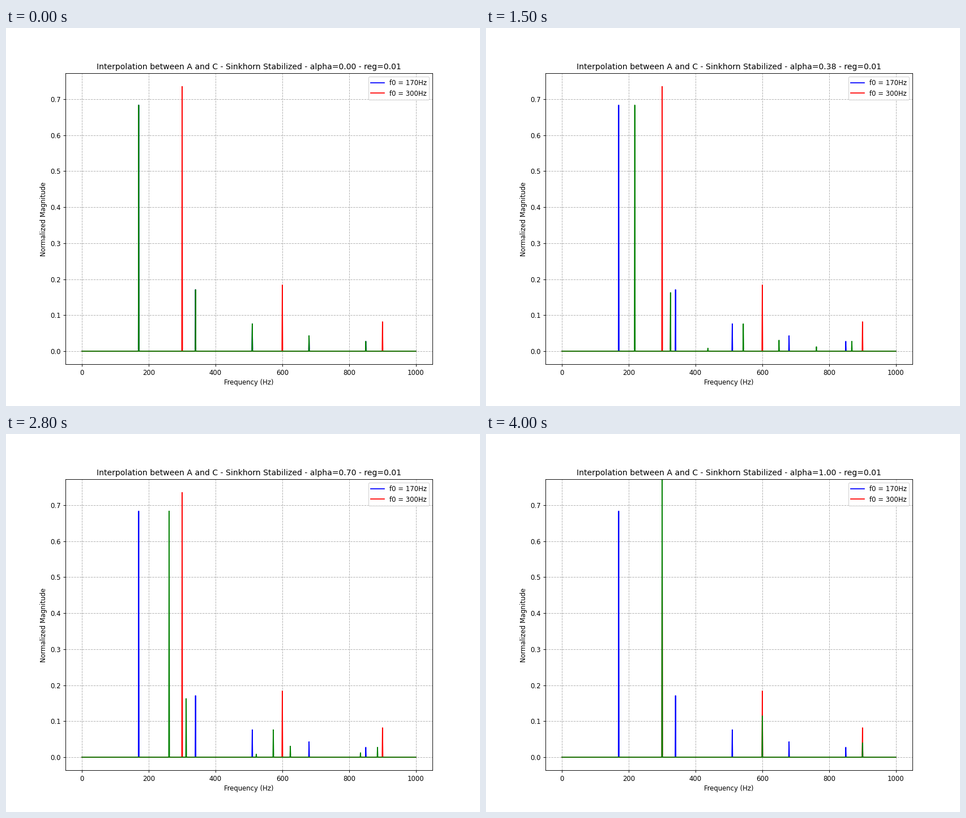
A matplotlib script that plays this animation: 837x669 px, repeating every 4.1 s.

```python
import numpy as np
import matplotlib.pyplot as plt
from matplotlib.animation import FuncAnimation

WIDTH, HEIGHT, DPI = 837, 669, 83.7
STEPS = 40
REG = 0.01
FREQS = np.arange(1001)


def harmonics(f0):
    """Normalized spectrum with 1/n^2 partials of f0."""
    n = np.arange(1, 999 // f0 + 1)
    mags = np.zeros(FREQS.size)
    mags[n * f0] = 1 / n**2
    return mags / mags.sum()


def sinkhorn(source, target, iterations=9):
    """Entropic transport plan, stopped before full convergence."""
    x = FREQS / 1000
    kernel = np.exp(-(x[:, None] - x) ** 2 / REG)
    u = np.ones(x.size)
    for _ in range(iterations):
        v = target / (kernel.T @ u)
        u = source / (kernel @ v)
    return u[:, None] * kernel * v


low, high = harmonics(170), harmonics(300)
plan = sinkhorn(low, high)
start, end = np.nonzero(plan > 1e-4)
mass = plan[start, end]


def interpolate(step):
    mags = np.zeros(FREQS.size)
    np.add.at(mags, start + (end - start) * step // STEPS, mass)
    return mags


# The tiny excess keeps the pixel size from truncating downwards
fig, ax = plt.subplots(
    figsize=((WIDTH + 0.001) / DPI, (HEIGHT + 0.001) / DPI), dpi=DPI)
ax.plot(FREQS, low, color="blue", label="f0 = 170Hz")
ax.plot(FREQS, high, color="red", label="f0 = 300Hz")
ax.set_xlim(-50, 1050)
ax.set_ylim(-0.05 * high.max(), 1.05 * high.max())
blend, = ax.plot(FREQS, low, color="green")
ax.set_xlabel("Frequency (Hz)")
ax.set_ylabel("Normalized Magnitude")
ax.grid(True, linestyle="--")
ax.legend(loc="upper right")
title = ax.set_title("")


def update(step):
    blend.set_ydata(interpolate(step))
    title.set_text("Interpolation between A and C - Sinkhorn Stabilized"
                   f" - alpha={step / STEPS:.2f} - reg={REG}")
    return blend, title


anim = FuncAnimation(fig, update, frames=STEPS + 1, interval=100,
                     repeat=True, repeat_delay=0, blit=False)
plt.show()
```
